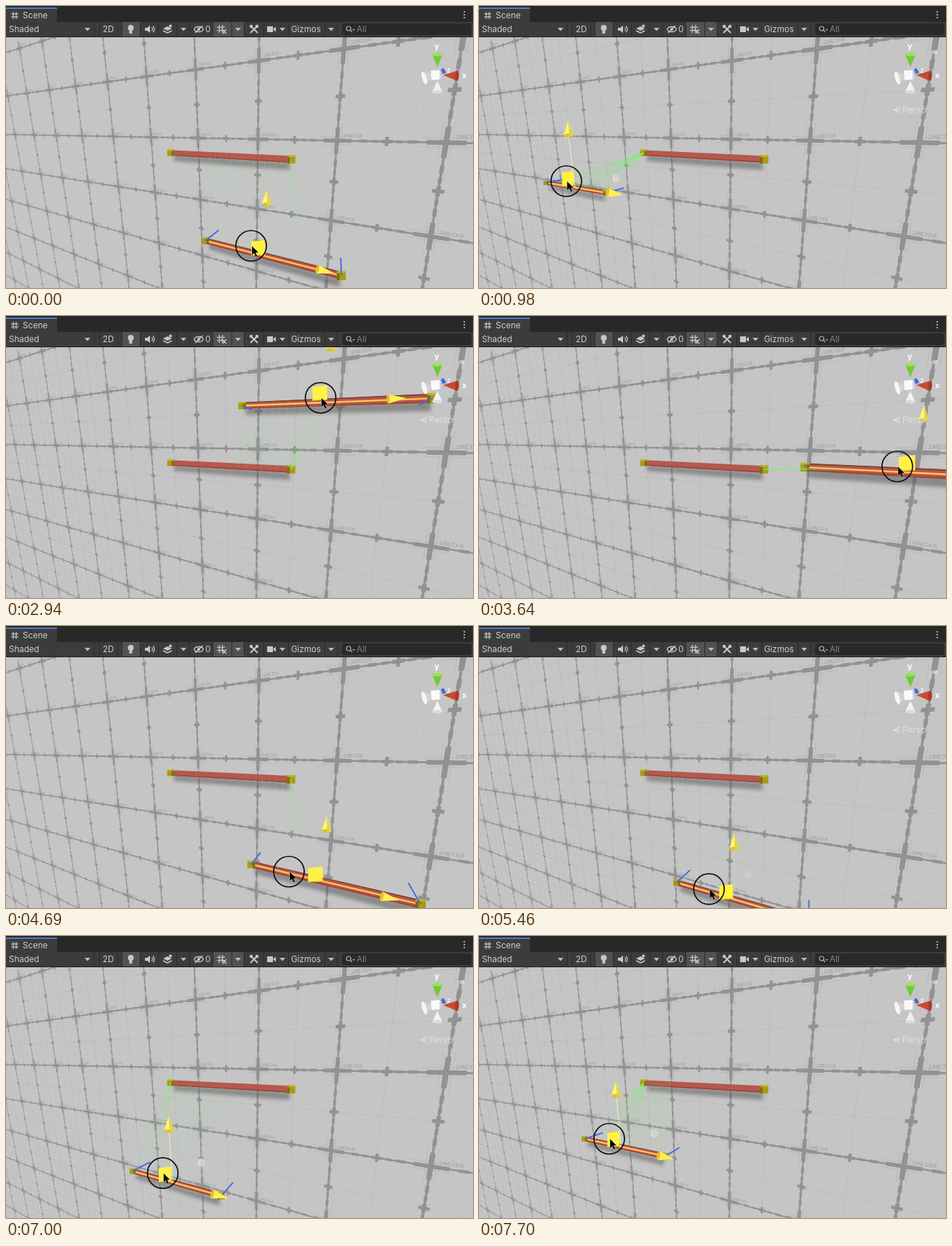
Write an HTML page with a canvas that moves like this. It is 642 by 388 pixels and loops after 7.77 s.

```html
<!DOCTYPE html>
<html lang="en">
<head>
<meta charset="utf-8">
<title>Scene</title>
<style>
html, body { margin: 0; width: 100%; height: 100%; overflow: hidden; background: #c5c5c5; }
canvas { display: block; }
</style>
</head>
<body>
<canvas id="stage" width="642" height="388"></canvas>
<script>
const W = 642, H = 388, LOOP = 7770, STEP = 70, TOP = 43;
const ctx = document.getElementById('stage').getContext('2d');
const VANISH = [455, 180];
const FIXED = [[226, 202], [392, 211]];

// time, handle x y, left end x y, right end x y, cursor x y
const KEYS = [
  [0, 358, 344, 274, 323, 461, 371, 337, 330],
  [980, 132, 249, 92, 243, 175, 257, 120, 241],
  [2240, 250, 66, 177, 79, 325, 52, 250, 62],
  [3640, 601, 214, 448, 208, 800, 226, 575, 207],
  [4690, 437, 353, 337, 328, 570, 383, 389, 338],
  [6370, 268, 370, 206, 351, 344, 393, 253, 356],
  [7700, 195, 291, 145, 279, 256, 303, 179, 279]
];

const clamp = (x, a = 0, b = 1) => Math.min(b, Math.max(a, x));
const mix = (a, b, k) => [a[0] + (b[0] - a[0]) * k, a[1] + (b[1] - a[1]) * k];
const dist = (a, b) => Math.hypot(a[0] - b[0], a[1] - b[1]);

function slope(i, c) {
  const a = KEYS[Math.max(i - 1, 0)], b = KEYS[Math.min(i + 1, KEYS.length - 1)];
  return (b[c] - a[c]) / (b[0] - a[0]);
}

function pose(t) {
  let i = 0;
  while (i < KEYS.length - 2 && t >= KEYS[i + 1][0]) i++;
  const a = KEYS[i], b = KEYS[i + 1], span = b[0] - a[0];
  const k = clamp((t - a[0]) / span), k2 = k * k, k3 = k2 * k;
  const v = a.map((p, c) => c === 0 ? t :
    (2 * k3 - 3 * k2 + 1) * p + (3 * k2 - 2 * k3) * b[c] +
    span * ((k3 - 2 * k2 + k) * slope(i, c) + (k3 - k2) * slope(i + 1, c)));
  return { o: [v[1], v[2]], a: [v[3], v[4]], b: [v[5], v[6]], cur: [v[7], v[8]] };
}

function poly(c, pts, fill) {
  c.fillStyle = fill;
  c.beginPath();
  pts.forEach(p => c.lineTo(p[0], p[1]));
  c.closePath();
  c.fill();
}

function line(c, a, b, color, width) {
  c.strokeStyle = color;
  c.lineWidth = width;
  c.beginPath();
  c.moveTo(a[0], a[1]);
  c.lineTo(b[0], b[1]);
  c.stroke();
}

function disc(c, x, y, rx, ry, fill, turn = 0) {
  c.fillStyle = fill;
  c.beginPath();
  c.ellipse(x, y, rx, ry, turn, 0, 7);
  c.fill();
}

// Wall grid: u counts metres leftwards, v downwards.
function wall(u, v) {
  const w = 1 + 0.19 * u + 0.082 * v;
  return [(605 - 63.5 * u + 26.8 * v) / w, (188 + 32.4 * u + 155 * v) / w];
}

function patch(c, u, v, du, dv, fill) {
  poly(c, [wall(u - du, v - dv), wall(u + du, v - dv), wall(u + du, v + dv), wall(u - du, v + dv)], fill);
}

function label(c, u, v) {
  const p = wall(u, v), x = wall(u - 0.01, v), y = wall(u, v + 0.01);
  c.save();
  c.setTransform(x[0] - p[0], x[1] - p[1], y[0] - p[0], y[1] - p[1], p[0], p[1]);
  c.font = '6px "Liberation Mono", monospace';
  c.fillStyle = '#a0a0a0';
  c.fillText('1METER', 6, -4);
  c.restore();
}

function makeWall(fine) {
  const cv = document.createElement('canvas');
  cv.width = W;
  cv.height = H;
  const c = cv.getContext('2d');
  c.fillStyle = '#c5c5c5';
  c.fillRect(0, 0, W, H);
  const ink = '#929292';
  const tick = [[0, 0.17, 0.025], [0.27, 0.045, 0.02], [0.385, 0.035, 0.018], [0.5, 0.06, 0.022],
    [0.615, 0.035, 0.018], [0.73, 0.045, 0.02], [1, 0.17, 0.025]];
  for (let u = -1; u < 12; u++) {
    for (let v = -2; v < 7; v++) {
      if (fine) {
        for (const h of [0.25, 0.5, 0.75]) {
          const col = h === 0.5 ? '#bababa' : '#c0c0c0';
          line(c, wall(u + h, v), wall(u + h, v + 1), col, 0.8);
          line(c, wall(u, v + h), wall(u + 1, v + h), col, 0.8);
        }
      }
      for (const s of [-0.045, 0.045]) {
        line(c, wall(u + s, v - 0.2), wall(u + s, v + 0.2), '#b4b4b4', 0.7);
        line(c, wall(u - 0.2, v + s), wall(u + 0.2, v + s), '#b4b4b4', 0.7);
      }
      patch(c, u, v + 0.5, 0.01, 0.5, ink);
      patch(c, u + 0.5, v, 0.5, 0.01, ink);
      for (const [at, len, wide] of tick) {
        patch(c, u, v + at, wide * 0.85, len * 0.9, ink);
        patch(c, u + at, v, len * 0.9, wide * 0.85, ink);
      }
      patch(c, u, v + 0.5, 0.05, 0.02, ink);
      patch(c, u + 0.5, v, 0.016, 0.05, ink);
      patch(c, u, v, 0.06, 0.022, ink);
      patch(c, u, v, 0.022, 0.06, ink);
      label(c, u, v);
    }
  }
  return cv;
}

const walls = [makeWall(false), makeWall(true)];

const size = x => 2.6 + x * 0.0078;

function strip(a, b, lo, hi, fill) {
  const ra = size(a[0]), rb = size(b[0]);
  poly(ctx, [[a[0], a[1] + ra * lo], [b[0], b[1] + rb * lo], [b[0], b[1] + rb * hi], [a[0], a[1] + ra * hi]], fill);
}

function cap(p, side) {
  const r = size(p[0]);
  ctx.fillStyle = '#a89a14';
  ctx.fillRect(p[0] - r, p[1] - r, 2 * r, 2 * r);
  ctx.fillStyle = '#786c10';
  ctx.fillRect(side < 0 ? p[0] + r * 0.4 : p[0] - r, p[1] - r, r * 0.6, 2 * r);
  ctx.fillStyle = '#c4b422';
  ctx.fillRect(p[0] - r, p[1] - r, 2 * r, r * 0.4);
}

function bar(a, b, chosen) {
  ctx.save();
  ctx.filter = 'blur(2.5px)';
  strip([a[0] + 5, a[1] + 3], [b[0] - 2, b[1] + 4], 0, 1.9, 'rgba(80,80,80,.5)');
  ctx.restore();
  strip(a, b, -0.85, 0.85, '#b5584d');
  strip(a, b, 0.5, 0.85, '#9c493f');
  if (chosen) {
    strip(a, b, -0.9, -0.65, '#7d4038');
    line(ctx, a, b, '#ff9a38', 2.6);
    line(ctx, a, b, '#ffe070', 1.1);
  }
  cap(a, -1);
  cap(b, 1);
}

function nearest(p) {
  const [a, b] = FIXED, dx = b[0] - a[0], dy = b[1] - a[1];
  return mix(a, b, clamp(((p[0] - a[0]) * dx + (p[1] - a[1]) * dy) / (dx * dx + dy * dy)));
}

function rays(a, b) {
  const reach = 152, n = 25;
  for (let i = 0; i <= n; i++) {
    const p = mix(a, b, i / n), q = nearest(p), d = dist(p, q);
    if (d >= reach) continue;
    const alpha = 0.1 + 0.35 * (1 - d / reach);
    const g = ctx.createLinearGradient(q[0], q[1], p[0], p[1]);
    g.addColorStop(0, `rgba(110,245,100,${alpha * 1.3})`);
    g.addColorStop(1, `rgba(130,240,120,${alpha * 0.7})`);
    line(ctx, q, p, g, 1);
  }
}

function cone(base, tip, r, fill, end) {
  const turn = Math.atan2(tip[1] - base[1], tip[0] - base[0]);
  const nx = -Math.sin(turn) * r, ny = Math.cos(turn) * r;
  poly(ctx, [[base[0] + nx, base[1] + ny], tip, [base[0] - nx, base[1] - ny]], fill);
  disc(ctx, base[0], base[1], r * 0.35, r, end, turn);
}

function handle({ o, a, b }) {
  for (const p of [a, b]) {
    line(ctx, p, mix(p, VANISH, 0.06 + 0.00015 * p[0]), '#4268e6', 1.8);
  }
  const fade = clamp((dist(o, VANISH) - 200) / 90);
  const lean = (o[0] - 350) * 0.04;
  const up = [o[0] + lean, o[1] - 71];
  if (fade > 0) {
    line(ctx, o, up, `rgba(255,250,200,${fade * 0.75})`, 1.2);
    const ball = mix(o, VANISH, 0.175);
    disc(ctx, ball[0], ball[1], 5, 5.5, `rgba(226,226,226,${fade * 0.85})`);
    disc(ctx, ball[0] + 1, ball[1] - 1, 3.5, 4.5, `rgba(205,205,205,${fade * 0.7})`);
  }
  cone(up, [up[0] + lean * 0.1, up[1] - 20], 7, '#fff56c', '#d6c23c');
  poly(ctx, [[up[0] + 1, up[1] + 2], [up[0] + lean * 0.1, up[1] - 20], [up[0] + 7, up[1]]], '#e2d24c');

  const len = 45 + (o[0] - 130) * 0.12, full = dist(a, b);
  const dir = [(b[0] - a[0]) / full, (b[1] - a[1]) / full];
  const along = s => [o[0] + dir[0] * s, o[1] + dir[1] * s];
  cone(along(len), along(len + 18 + len * 0.08), 6.5, '#fff04e', '#e0c030');

  const x = o[0] - 9 - o[0] * 0.006, y = o[1] - 11, hw = 7 + o[0] * 0.007;
  poly(ctx, [[x - hw, y - 9], [x + hw, y - 11], [x + hw, y + 9], [x - hw, y + 10]], '#fff243');
  line(ctx, [x - hw, y + 10], [x + hw, y + 9], '#e0cc30', 1);
}

function arrow([x, y]) {
  ctx.strokeStyle = '#111';
  ctx.lineWidth = 1.7;
  ctx.beginPath();
  ctx.arc(x, y, 21, 0, 7);
  ctx.stroke();
  const shape = [[0, 0], [0, 13], [3, 10.3], [5.2, 15], [7.5, 14], [5.4, 9.4], [9.3, 9.2]]
    .map(p => [x + 1 + p[0], y + p[1]]);
  poly(ctx, shape, '#000');
  ctx.strokeStyle = 'rgba(255,255,255,.65)';
  ctx.lineWidth = 0.6;
  ctx.stroke();
}

function text(s, x, y, color = '#d0d0d0', font = '11.5px') {
  ctx.font = font + ' Inter, Roboto, sans-serif';
  ctx.fillStyle = color;
  ctx.fillText(s, x, y);
}

function compass(named) {
  cone([602, 89], [594, 94], 4, '#4d78dc', '#3b66d0');
  cone([593, 67], [593, 84], 7, '#72c936', '#9ae060');
  cone([620, 96], [601, 95], 7, '#c94a30', '#a83a26');
  cone([593, 118], [593, 103], 7, '#f2f2f2', '#dcdcdc');
  cone([575, 99], [589, 95], 9, '#d2d2d2', '#f6f6f6');
  poly(ctx, [[584, 89], [596, 88], [596, 101], [585, 102]], '#fafafa');
  poly(ctx, [[596, 88], [599, 90], [599, 100], [596, 101]], '#d2d2d2');
  text('y', 589, 59, '#fff', 'bold 11px');
  text('x', 627, 99, '#fff', 'bold 11px');
  text('z', 606, 92, '#e4ebff', 'bold 10px');
  if (named) {
    const pale = 'rgba(240,240,240,.65)';
    text('Persp', 582, 147, pale, '12px');
    for (const y of [139, 143, 147]) line(ctx, [570, 143], [579, y], pale, 1.1);
    ctx.fillStyle = 'rgba(235,235,235,.55)';
    ctx.fillRect(624, 61, 6, 5);
  } else {
    ctx.fillStyle = 'rgba(255,255,255,.7)';
    ctx.fillRect(569, 142, 2, 1);
  }
}

function drop(x) {
  poly(ctx, [[x - 4, 30], [x + 4, 30], [x, 34.5]], '#bdbdbd');
}

function hash(x, y, s, color) {
  for (const k of [0.3, 0.7]) {
    line(ctx, [x + s * k, y], [x + s * k, y + s], color, 1.2);
    line(ctx, [x, y + s * k], [x + s, y + s * k], color, 1.2);
  }
}

function box(x, y, w, h, fill) {
  ctx.fillStyle = fill;
  ctx.fillRect(x, y, w, h);
}

function toolbar() {
  const ink = '#c8c8c8';
  box(0, 0, W, 22, '#282828');
  box(0, 3, 70, 19, '#3c3c3c');
  box(0, 2, 70, 2, '#4a7fc1');
  box(0, 22, W, 21, '#3c3c3c');
  box(0, 42, W, 1, '#232323');
  hash(7, 8, 10, ink);
  text('Scene', 23, 17);
  for (const y of [8, 12, 16]) disc(ctx, 630, y, 1.1, 1.1, ink);

  box(160, 22, 24, 20, '#525252');
  box(285, 22, 42, 20, '#525252');
  for (const x of [121, 128, 153, 159, 184, 209, 234, 252, 284, 310, 327, 354, 388, 438, 455]) box(x, 22, 1, 20, '#2b2b2b');
  text('Shaded', 4, 36);
  text('2D', 133, 36);
  text('Gizmos', 392, 36);
  text('0', 274, 36);
  [112, 244, 319, 380, 447].forEach(drop);

  disc(ctx, 171.5, 30, 4, 4, ink);
  box(169.5, 33, 4, 5, ink);
  poly(ctx, [[191, 30], [194, 30], [198, 27], [198, 37], [194, 34], [191, 34]], ink);
  ctx.strokeStyle = ink;
  ctx.lineWidth = 1.2;
  for (const r of [3, 5.5]) {
    ctx.beginPath();
    ctx.arc(198.5, 32, r, -0.9, 0.9);
    ctx.stroke();
  }
  poly(ctx, [[216, 31], [222, 28], [228, 31], [222, 34]], ink);
  line(ctx, [216, 34], [222, 37], ink, 1.5);
  line(ctx, [222, 37], [228, 34], ink, 1.5);
  disc(ctx, 226, 27.5, 2, 2, ink);

  ctx.beginPath();
  ctx.ellipse(265, 32, 6, 3.6, 0, 0, 7);
  ctx.stroke();
  disc(ctx, 265, 32, 2, 2, ink);
  line(ctx, [260, 37], [270, 27], ink, 1.4);
  hash(290, 26, 11, ink);
  line(ctx, [296, 32], [303, 38], ink, 1.5);
  line(ctx, [303, 32], [298, 38], ink, 1.2);
  line(ctx, [336, 27], [346, 37], ink, 2);
  line(ctx, [346, 27], [336, 37], ink, 2);
  disc(ctx, 337, 28, 2.2, 2.2, ink);
  disc(ctx, 345, 28, 2.2, 2.2, ink);
  box(359, 28, 8, 8, ink);
  poly(ctx, [[367, 32], [371, 28.5], [371, 35.5]], ink);

  ctx.fillStyle = '#292929';
  ctx.beginPath();
  ctx.roundRect(462, 24, 178, 16, 4);
  ctx.fill();
  ctx.strokeStyle = '#b0b0b0';
  ctx.lineWidth = 1.2;
  ctx.beginPath();
  ctx.arc(471, 31, 3, 0, 7);
  ctx.stroke();
  line(ctx, [473, 33], [476, 36], '#b0b0b0', 1.3);
  poly(ctx, [[476, 32], [480, 32], [478, 34]], '#b0b0b0');
  text('All', 482, 36, '#858585');
}

function draw(now) {
  const t = Math.floor(now % LOOP / STEP) * STEP;
  const p = pose(t);
  const fine = (t >= 490 && t < 1680) || (t >= 2940 && t < 4200) || t >= 5390;
  ctx.drawImage(walls[+fine], 0, 0);
  ctx.save();
  ctx.beginPath();
  ctx.rect(0, TOP, W, H - TOP);
  ctx.clip();
  bar(FIXED[0], FIXED[1], false);
  bar(p.a, p.b, true);
  rays(p.a, p.b);
  handle(p);
  compass(fine);
  ctx.restore();
  toolbar();
  arrow(p.cur);
}

let start = null;
function tick(now) {
  if (start === null) start = now;
  draw(now - start);
  requestAnimationFrame(tick);
}
draw(0);
requestAnimationFrame(tick);
</script>
</body>
</html>
```
